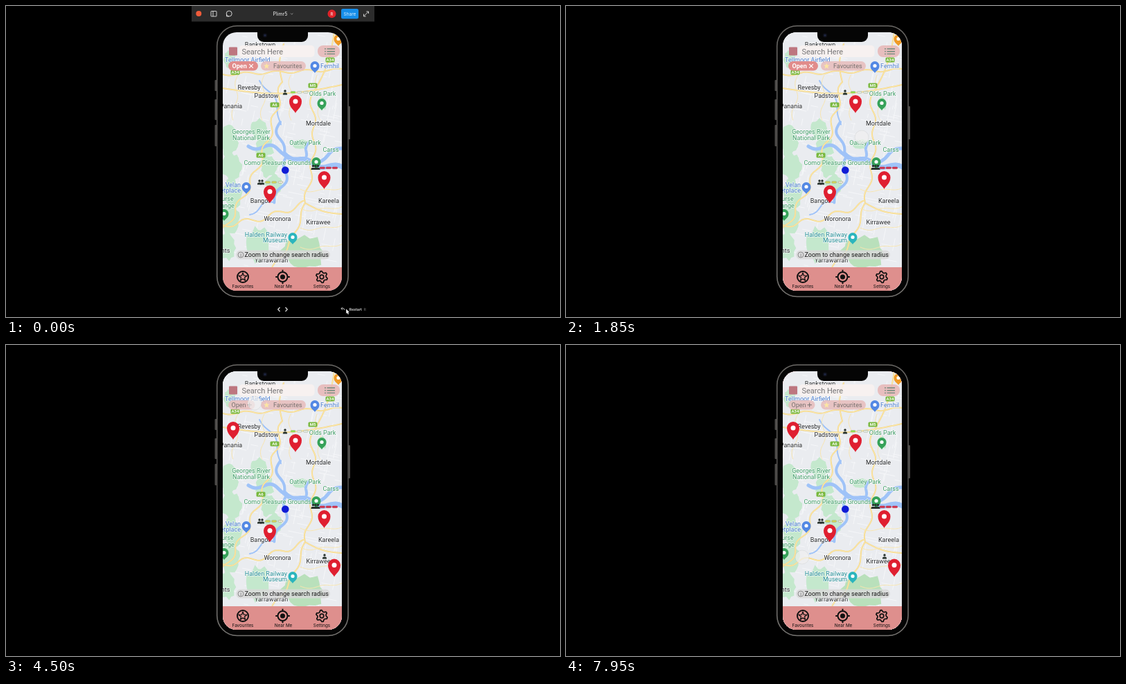
Animation, 800 px wide and 450 px high, one loop 8000 ms. Source, as an HTML page with a canvas:

```html
<!DOCTYPE html>
<html lang="en">
<head>
<meta charset="utf-8">
<title>Map prototype</title>
<style>
  html, body { margin: 0; width: 100%; height: 100%; overflow: hidden; background: #000; }
  canvas { display: block; width: 800px; height: 450px; }
</style>
</head>
<body>
<canvas id="stage" width="800" height="450"></canvas>
<script>
const LOOP = 8000, TAU = Math.PI * 2;
const stage = document.getElementById('stage');
const main = stage.getContext('2d');
let g = main;

const PINK = '#de8f8d', RED = '#df1f30', GREEN = '#36a259', BLUE = '#5388e4', TEAL = '#2bb5bd';
const TOWN = '#24272b', LEAF = '#3d9b65', SHOP = '#4478cb', SIGHT = '#258d96';

const times = (n, f) => Array.from({ length: n }, (_, i) => f(i));
const clamp = v => Math.min(1, Math.max(0, v));
const ease = v => v * v * (3 - 2 * v);

let seed = 11;
const rnd = () => (seed = seed * 16807 % 2147483647) / 2147483647;

// ---- drawing helpers ----
function paint(fill, stroke, width = 1) {
  if (fill) { g.fillStyle = fill; g.fill(); }
  if (stroke) { g.strokeStyle = stroke; g.lineWidth = width; g.stroke(); }
}

function box(x, y, w, h, r, fill, stroke, width) {
  g.beginPath();
  g.roundRect(x, y, w, h, r);
  paint(fill, stroke, width);
}

function disc(x, y, r, fill, stroke, width) {
  g.beginPath();
  g.arc(x, y, r, 0, TAU);
  paint(fill, stroke, width);
}

function line(color, width, ...p) {
  g.beginPath();
  for (let i = 0; i < p.length; i += 2) g.lineTo(p[i], p[i + 1]);
  paint(null, color, width);
}

// Closed shape whose radius depends on the step.
function ring(x, y, n, radius, fill, stroke, width, squash = 1) {
  g.beginPath();
  for (let i = 0; i < n; i++) {
    const a = i / n * TAU - Math.PI / 2, r = radius(i);
    g.lineTo(x + Math.cos(a) * r, y + Math.sin(a) * r * squash);
  }
  g.closePath();
  paint(fill, stroke, width);
}

const star = (x, y, r, fill, stroke) =>
  ring(x, y, 10, i => i % 2 ? r * .42 : r, fill, stroke, 1.3);

// Line between two points, bowed sideways and rippled.
function wander(color, width, x0, y0, x1, y1, bow = 0, ripple = 0) {
  const dx = x1 - x0, dy = y1 - y0, len = Math.hypot(dx, dy), turns = Math.max(2, len / 22);
  g.beginPath();
  for (let u = 0; u <= 1.001; u += .02) {
    const off = bow * Math.sin(Math.PI * u) + ripple * Math.sin(turns * Math.PI * u);
    g.lineTo(x0 + dx * u - dy / len * off, y0 + dy * u + dx / len * off);
  }
  g.lineCap = g.lineJoin = 'round';
  paint(null, color, width);
  g.lineCap = 'butt';
}

function text(s, x, y, size, color, align = 'left', weight = 400, family = 'Roboto') {
  g.font = `${weight} ${size}px ${family}, sans-serif`;
  g.textAlign = align;
  g.fillStyle = color;
  g.fillText(s, x, y);
}

function label(s, x, y, color = TOWN, align = 'center') {
  g.font = '400 9px Roboto, sans-serif';
  g.textAlign = align;
  g.strokeStyle = 'rgba(255,255,255,.75)';
  g.lineWidth = 1.6;
  g.lineJoin = 'round';
  g.strokeText(s, x, y);
  text(s, x, y, 9, color, align);
}

// Drop marker whose tip stands at (x, y).
function marker(x, y, r, h, fill, dot) {
  const cy = y - h + r;
  g.beginPath();
  g.arc(x, cy, r, Math.PI, 0);
  g.bezierCurveTo(x + r, cy + r, x + r * .2, y - r * .5, x, y);
  g.bezierCurveTo(x - r * .2, y - r * .5, x - r, cy + r, x - r, cy);
  paint(fill);
  disc(x, cy, dot, '#fff');
}

const pin = (x, y) => marker(x, y, 9, 26, RED, 3.5);
const poi = (x, y, color) => marker(x, y, 6.5, 17, color, 2.6);

function person(x, y) {
  disc(x, y - 2, 1.7, '#26312c');
  box(x - 3, y + .6, 6, 2.8, [2, 2, 0, 0], '#26312c');
}

// Three capsules, the first `full` of them filled.
function meter(x, y, w, h, gap, full, fill, empty, stroke) {
  for (let i = 0; i < 3; i++)
    box(x + i * (w + gap), y, w, h, h / 2, i < full ? fill : empty, stroke, .7);
}

function badge(s, x, y) {
  box(x - 6.5, y - 3.5, 13, 7, 1.5, '#79b83e');
  text(s, x, y + 2.2, 6, '#fff', 'center', 700);
}

// ---- map ----
function park(x, y, rx, ry, color = '#c4e8cd') {
  ring(x, y, 22, () => rx * (.8 + rnd() * .4), color, null, 0, ry / rx);
}

function road(...way) {
  wander('#f0d48a', 2, ...way);
  wander('#fce6a4', 1.2, ...way);
}

function river(width, ...way) {
  wander('#9fc3f8', width, ...way);
}

function terrain() {
  box(313, 38, 172, 374, 0, '#eaecf0');
  for (let i = 0; i < 260; i++) {
    const a = (i % 2) * Math.PI / 2 + .2, d = 5 + rnd() * 20;
    const x = 313 + rnd() * 172, y = 38 + rnd() * 340;
    line('#f7f8fa', .9, x, y, x + Math.cos(a) * d, y + Math.sin(a) * d);
  }

  for (let i = 0; i < 5; i++) park(322 + 5 * Math.sin(i), 195 + i * 38, 13, 21);
  for (let i = 0; i < 4; i++) park(366 + 7 * i, 178 + 27 * i, 13, 15);
  park(364, 346, 15, 27);
  park(425, 200, 13, 7);
  park(457, 141, 6, 9);
  park(323, 77, 9, 13);
  park(431, 358, 30, 24, '#b9e0bb');

  river(2, 366, 108, 396, 172, -8, 2);
  river(4, 396, 168, 405, 216, 6, 4);
  river(5, 350, 203, 405, 212, -3, 4);
  river(7, 402, 214, 487, 234, 4, 3);
  river(4, 430, 223, 437, 198, 0, 2);
  river(5, 452, 226, 485, 206, -3, 2);
  river(4, 405, 218, 386, 284, -6, 4);
  river(2, 386, 284, 352, 302, 3, 3);

  road(313, 119, 485, 114, 10);
  road(313, 99, 485, 92, 0, 2);
  road(401, 55, 399, 110, 5);
  road(399, 110, 316, 322, -12, 4);
  road(474, 38, 441, 130, -6);
  road(441, 130, 432, 283, -8, 3);
  road(313, 317, 432, 285, 5, 4);
  road(432, 285, 485, 301, 4);
  road(432, 285, 386, 378, -6, 2);
  for (let i = 0; i < 4; i++) {
    wander('#f8e5ae', 1, 335 + i * 38, 100, 328 + i * 42, 165, 0, 3);
    wander('#f8e5ae', 1, 425, 265 + i * 28, 485, 262 + i * 27, 4, 2);
  }
}

function places() {
  label('Bankstown', 367, 59);
  label('Tellmoor Airfield', 316, 81, SHOP, 'left');
  label('Fernhil', 454, 90, SHOP, 'left');
  badge('A34', 331, 96);
  badge('A34', 468, 78);
  badge('M5', 443, 115);
  badge('A6', 388, 143);
  badge('A6', 368, 216);

  label('Revesby', 351, 121);
  label('Padstow', 376, 133);
  label('Panania', 325, 148);
  label('Mortdale', 451, 173);
  label('Bangor', 367, 285);
  label('Kareela', 466, 285);
  label('Woronora', 392, 311);
  label('Kirrawee', 451, 316);
  label('Yarrawarrah', 383, 371);
  label('nts', 317, 357);

  label('Olds Park', 457, 130, LEAF);
  label('Georges River', 354, 185, LEAF);
  label('National Park', 354, 194, LEAF);
  label('Oatley Park', 432, 201, LEAF);
  label('Carss', 469, 211, LEAF);
  label('Como Pleasure Grounds', 392, 230, LEAF);
  label('urse', 320, 282, LEAF);
  label('ange', 320, 292, LEAF);

  label('Velan', 339, 262, SHOP, 'right');
  label('rketplace', 339, 270, SHOP, 'right');
  label('Halden Railway', 406, 334, SIGHT, 'right');
  label('Museum', 406, 342, SIGHT, 'right');

  poi(446, 97, BLUE);
  poi(347, 272, BLUE);
  poi(456, 151, GREEN);
  poi(448, 236, GREEN);
  poi(315, 311, GREEN);
  poi(414, 345, TEAL);
  poi(480, 58, '#f09b27');
}

function crowds(all) {
  person(403, 125);
  meter(411, 123.5, 7, 2.6, 2.2, 1, '#8ee53a', '#e9eee6', '#a9b79d');
  person(366, 255);
  person(370, 255);
  meter(374.5, 253.7, 7, 2.6, 2.2, 2, '#d5df4e', '#f1ede4', '#aaa98a');
  for (let i = 0; i < 3; i++) person(443.5 + i * 3.5, 233.5);
  meter(453, 233, 7.5, 2.6, 1.6, 3, '#d92d46', null, '#b3465c');
  pin(418, 155);
  pin(381, 285.5);
  pin(459.5, 265);
  if (all) {
    person(460, 306);
    pin(328, 137);
    pin(474, 335.5);
  }
  disc(403.3, 237.5, 5.3, '#101bd5');
}

// ---- shared interface ----
function filters(open, tint, ink) {
  if (open) {
    box(321, 80, 43, 13.5, 6.7, '#e18c8b');
    text('Open', 326.5, 90, 9, '#fff', 'left', 700);
    line('#fff', 1.2, 351.3, 84.2, 356.8, 89.7);
    line('#fff', 1.2, 356.8, 84.2, 351.3, 89.7);
  } else {
    box(321, 80, 38.5, 13.5, 6.7, tint);
    text('Open', 325.5, 90, 9, ink);
    line(ink, 1, 348.5, 86.7, 355, 86.7);
    line(ink, 1, 351.7, 83.5, 351.7, 90);
  }
  box(368, 80, 65, 13.5, 6.7, tint);
  star(376.3, 87, 4.6, '#fbe6a3');
  text('Favourites', 386, 90, 9, ink);
}

function header(barFill, tint, ink) {
  box(336.5, 57, 109, 17, 5, barFill);
  box(322, 59.5, 12, 12, 1, '#bd7680');
  text('Search Here', 340.5, 69.5, 11, ink);
  box(450, 57, 32, 17, 8, tint);
}

function navBar() {
  const ink = '#111';
  box(313, 378, 172, 34, 0, PINK);
  disc(342, 392, 8, null, ink, 2);
  star(342, 392.3, 6.2, null, ink);
  disc(399.5, 392, 7, null, ink, 2);
  disc(399.5, 392, 3.5, ink);
  for (let i = 0; i < 4; i++) {
    const dx = Math.cos(i * TAU / 4), dy = Math.sin(i * TAU / 4);
    line(ink, 2, 399.5 + dx * 7, 392 + dy * 7, 399.5 + dx * 10.3, 392 + dy * 10.3);
  }
  ring(456, 392, 24, i => (i + 1) % 4 < 2 ? 8.4 : 6.2, null, ink, 1.7);
  disc(456, 392, 2.8, null, ink, 1.7);
  const name = (s, x) => text(s, x, 408.3, 6.3, ink, 'center', 400, 'Inter');
  name('Favourites', 342);
  name('Near Me', 400.5);
  name('Settings', 456);
}

// ---- screens ----
function mapScreen(open) {
  seed = 11;
  terrain();
  places();
  crowds(!open);
  header('rgba(250,243,241,.87)', 'rgba(231,181,180,.82)', '#777678');
  for (let i = 0; i < 3; i++) {
    const y = 62 + i * 3.7;
    disc(461, y, .9, '#6f8a7c');
    line('#6f8a7c', 1.4, 463.5, y, 475, y);
  }
  filters(open, 'rgba(232,188,187,.84)', '#77716f');
  box(332, 353.5, 136, 13, 6.5, 'rgba(218,218,218,.85)');
  disc(339, 360, 4, null, '#777', .8);
  text('i', 339, 362.5, 7, '#666', 'center');
  text('Zoom to change search radius', 344.5, 363.2, 9, '#171717');
  navBar();
}

function listScreen() {
  const rowH = 66.2, rule = '#a19d9b', ink = '#333034';
  box(313, 38, 172, 374, 0, '#fff');
  box(313, 38, 172, 61, 0, PINK);
  header('#eac3c1', '#eccac8', '#7d7e7e');
  box(461.5, 61, 9, 9, 1, null, '#888', 1.2);
  line('#888', 1, 464.5, 61, 464.5, 70);
  line('#888', 1, 467.5, 61, 467.5, 70);
  filters(false, '#ecc8c6', '#7c8784');
  for (let i = 0; i < 4; i++) {
    const y = 99 + i * rowH, isOpen = i === 1 || i === 2;
    box(313, y, 172, rowH, 0, '#f9f4f2');
    box(313, y, 4, rowH, 0, isOpen ? '#75ea49' : '#d93a50');
    line(rule, 1, 313, y, 485, y);
    line(ink, 1.1, 326, y + 18.5, 374, y + 18.5);
    for (let k = 0; k < 3; k++) {
      const ly = y + 36.3 + k * 8.3;
      line(ink, 1.1, 324, ly, 434, ly);
    }
    marker(475, y + 39, 5.8, 17, RED, 2.1);
    star(475, y + 52.5, 7.2, i === 3 ? '#f0dc4d' : '#faefc5');
    if (isOpen)
      meter(411, y + 11, 19.5, 5.6, 6.5, i, i === 1 ? '#70ee3f' : '#f0ef4b', '#fff', '#8a8d89');
  }
  line(rule, 1, 313, 363.8, 485, 363.8);
  navBar();
}

function splashScreen() {
  box(313, 38, 172, 374, 0, '#fff');
  box(347, 121, 104, 104, 0, '#cf8d97');
}

function layer(draw) {
  const c = document.createElement('canvas');
  c.width = 800;
  c.height = 450;
  g = c.getContext('2d');
  g.beginPath();
  g.roundRect(313, 38, 172, 374, 20);
  g.clip();
  draw();
  g = main;
  return c;
}

const screens = {
  openMap: layer(() => mapScreen(true)),
  fullMap: layer(() => mapScreen(false)),
  list: layer(listScreen),
  splash: layer(splashScreen)
};

// ---- phone and prototype player ----
function phoneBody() {
  const metal = '#4c4a48';
  box(301.5, 107, 3, 16, 1, metal);
  box(301.5, 135, 3, 30, 1, metal);
  box(301.5, 172, 3, 31, 1, metal);
  box(494, 145, 3, 48, 1, metal);
  const rim = g.createLinearGradient(0, 28, 0, 421);
  rim.addColorStop(0, '#6b6966');
  rim.addColorStop(.5, '#484644');
  rim.addColorStop(1, '#777572');
  box(304.7, 28.7, 189.4, 391.8, 29, '#050505', rim, 1.6);
}

function notch() {
  box(363, 36, 73, 16, [0, 0, 9, 9], '#050505');
  disc(374, 42.5, 3, '#10121c');
  disc(374, 42.5, 1.3, '#202a48');
}

function playerChrome() {
  const ink = '#e4e4e4';
  box(268, 0, 264, 22.5, 0, '#2c2c2c');
  disc(278.3, 11, 4, '#ef5b3a');
  box(296, 7.5, 8, 7.5, .5, null, ink, .9);
  line(ink, .9, 299, 7.5, 299, 15);
  disc(322.2, 11, 4, null, ink, .9);
  line(ink, .9, 318.6, 12, 318.6, 15, 322, 15);
  text('Plimr5', 396, 13.7, 7, '#f4f4f4', 'center', 400, 'Inter');
  line('#aaa', .8, 411, 10.5, 412.7, 12.2, 414.4, 10.5);
  disc(470.5, 11.2, 6, '#df2329');
  text('R', 470.5, 13.5, 6, '#fff', 'center', 400, 'Inter');
  box(484, 4, 25, 14.5, 2.5, '#168eea');
  text('Share', 496.5, 13.6, 6.5, '#dff1ff', 'center', 400, 'Inter');
  line(ink, .9, 517, 14.5, 523, 8.5);
  line(ink, .9, 520.4, 8, 523.5, 8, 523.5, 11);
  line(ink, .9, 516.5, 11.5, 516.5, 15, 519.6, 15);
  line(ink, 1.1, 395.5, 436, 392.7, 439, 395.5, 442);
  line(ink, 1.1, 403.5, 436, 406.3, 439, 403.5, 442);
  line(ink, .8, 486, 435.8, 484, 437.8, 486, 439.8);
  line(ink, .8, 484, 437.8, 488, 437.8, 489, 440);
  text('Restart', 495.5, 441, 5.4, '#f0f0f0', 'left', 500, 'Inter');
  text('R', 516.5, 441, 5.2, '#777', 'left', 400, 'Inter');
}

function arrow(x, y) {
  g.beginPath();
  g.moveTo(x, y);
  g.lineTo(x, y + 7);
  g.lineTo(x + 5, y + 5);
  g.closePath();
  paint('#fff', '#111', .5);
  line('#fff', 1.3, x + 2, y + 5, x + 3.4, y + 8);
}

// ---- timeline ----
const cuts = [
  { at: 0, fade: 0, name: 'openMap' },
  { at: 200, fade: 0, name: 'splash' },
  { at: 875, fade: 300, name: 'openMap' },
  { at: 3750, fade: 0, name: 'fullMap' },
  { at: 5450, fade: 300, name: 'list' },
  { at: 6900, fade: 300, name: 'fullMap' }
];

const moves = [
  { from: 250, to: 850, x: 427, y: 209 },
  { from: 1150, to: 1800, x: 427, y: 190 },
  { from: 2500, to: 3400, x: 341, y: 87 },
  { from: 4300, to: 5150, x: 467, y: 66 },
  { from: 7150, to: 7900, x: 341, y: 307 }
];

function pointer(t) {
  let x = 491, y = 438;
  for (const m of moves) {
    const k = ease(clamp((t - m.from) / (m.to - m.from)));
    x += (m.x - x) * k;
    y += (m.y - y) * k;
  }
  return [x, y];
}

function draw(t) {
  box(0, 0, 800, 450, 0, '#000');
  phoneBody();
  for (const { at, fade, name } of cuts) {
    if (t < at) break;
    g.globalAlpha = fade ? clamp((t - at) / fade) : 1;
    g.drawImage(screens[name], 0, 0);
  }
  g.globalAlpha = 1;
  notch();
  if (t < 800) playerChrome();

  const [x, y] = pointer(t);
  const inside = x > 313 && x < 485 && y > 38 && y < 412;
  if (inside) disc(x, y, 10, 'rgba(240,240,240,.7)', 'rgba(150,150,150,.18)', .8);
  else arrow(x, y);
}

function tick() {
  draw(performance.now() % LOOP);
  requestAnimationFrame(tick);
}
tick();
</script>
</body>
</html>
```
